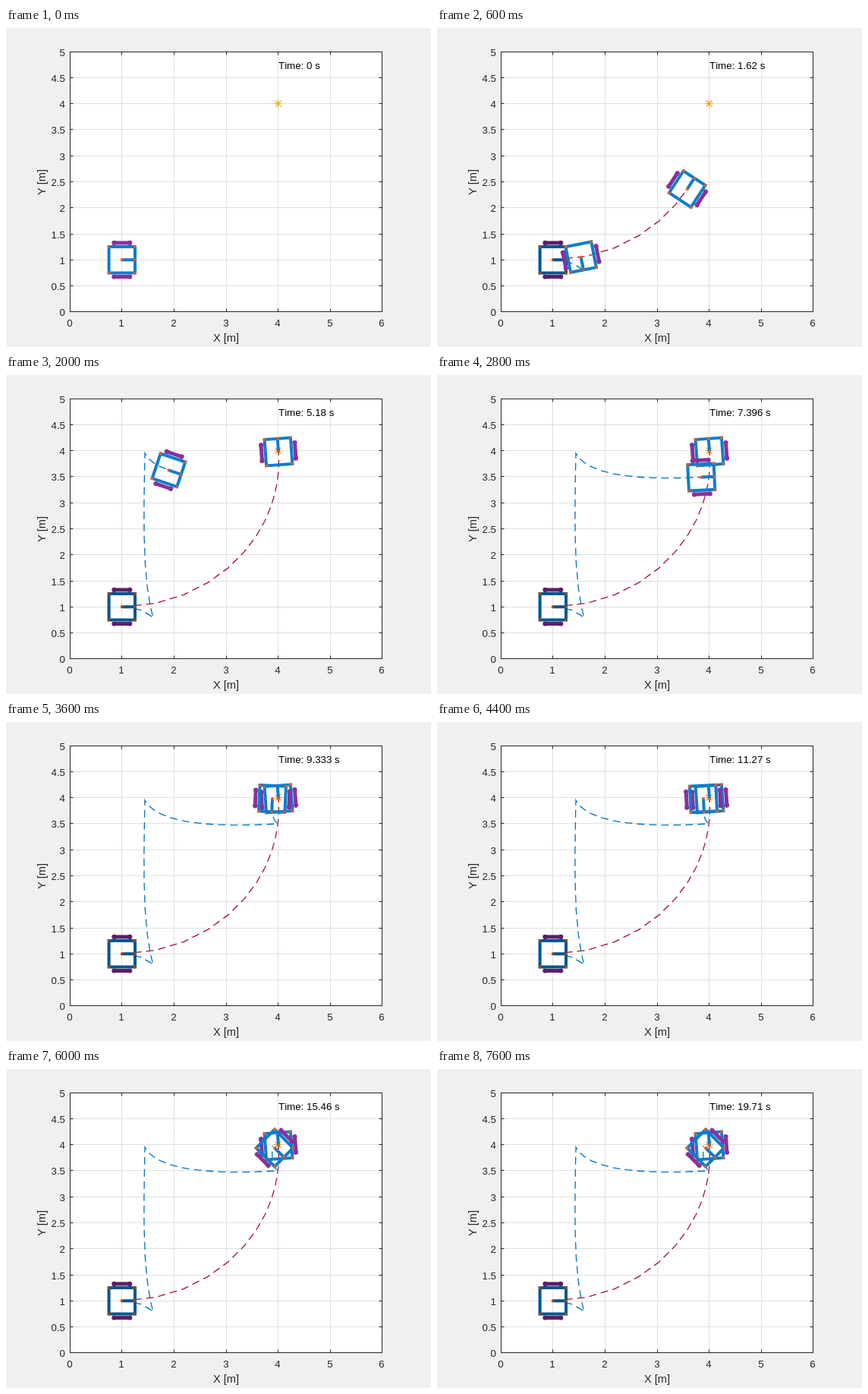
Animation, 560 px wide and 420 px high, one loop 7.8 s. Source, as an HTML page:

```html
<!DOCTYPE html>
<html lang="en">
<head>
<meta charset="utf-8">
<title>Two robots driving to a goal</title>
<style>
  html, body { margin: 0; width: 100%; height: 100%; overflow: hidden; background: #f0f0f0; }
  svg { display: block; width: 560px; height: 420px; }
  text { font: 13.33px "Liberation Sans", Arial, sans-serif; font-kerning: none; fill: #262626; }
  .title { font-size: 14.67px; }
  .grid { stroke: #dfdfdf; }
  .axis { stroke: #262626; fill: none; }
  .trail { fill: none; stroke-width: 1.3; stroke-dasharray: 10 6; }
  .robot { --body: #0a7dcc; --joint: #d95f2b; --wheel: #8a319b; }
  .robot.dark { --body: #00568f; --joint: #9c4a22; --wheel: #5b1f68; }
  .body { fill: none; stroke: var(--body); stroke-width: 4; }
  .joint { fill: var(--joint); }
  .wheel { stroke: var(--wheel); stroke-width: 5; }
  .hub { fill: var(--wheel); }
</style>
</head>
<body>
<svg id="stage" viewBox="0 0 560 420"></svg>
<script>
const STEP = 200, FRAMES = 39;
const stage = document.getElementById('stage');

function add(parent, tag, attrs, text) {
  const el = document.createElementNS('http://www.w3.org/2000/svg', tag);
  for (const key in attrs) el.setAttribute(key, attrs[key]);
  if (text !== undefined) el.textContent = text;
  parent.append(el);
  return el;
}
const path = (cls, d) => add(stage, 'path', { class: cls, d });
const label = (x, y, anchor, text, more) =>
  add(stage, 'text', { x, y, 'text-anchor': anchor, ...more }, text);

// Chart
const px = x => Math.round(83.8 + 68.6 * x);
const py = y => Math.round(373.49 - 68.58 * y);
const [left, right, top_, bottom] = [px(0), px(6), py(5), py(0)];
add(stage, 'rect', { x: left, y: top_, width: right - left, height: bottom - top_, fill: '#fff' });
let grid = '', ticks = '';
for (let x = 0; x <= 6; x++) {
  const p = px(x) + 0.5;
  grid += `M${p} ${top_}V${bottom}`;
  ticks += `M${p} ${top_}v4.5M${p} ${bottom + 1}v-4.5`;
  label(px(x), 393, 'middle', x);
}
for (let y = 0; y <= 5; y += 0.5) {
  const p = py(y) + 0.5;
  grid += `M${left} ${p}H${right}`;
  ticks += `M${left} ${p}h4.5M${right + 1} ${p}h-4.5`;
  label(78, py(y) + 6, 'end', y);
}
path('grid', grid);
path('axis', ticks + `M${left + 0.5} ${top_ + 0.5}H${right + 0.5}V${bottom + 0.5}H${left + 0.5}Z`);
label(290, 413, 'middle', 'X [m]', { class: 'title' });
label(0, 0, 'middle', 'Y [m]', { class: 'title', transform: 'translate(52 203) rotate(-90)' });
const clock = label(359, 54, 'start', '', { style: 'fill:#000' });

// Goal marker
const star = path('', 'M353 99.5h11M358.5 94v11M354.5 95.5l8 8M354.5 103.5l8-8');
star.setAttribute('stroke-width', 1.2);

const redTrail = path('trail', '');
const blueTrail = path('trail', '');
redTrail.style.stroke = '#a2142f';
blueTrail.style.stroke = '#0072bd';

function makeRobot() {
  const g = add(stage, 'g', { class: 'robot' });
  const half = 17.2, axle = 22.3, reach = 10.4;
  const dot = (cx, cy, r, cls) => add(g, 'circle', { cx, cy, r, class: cls });
  add(g, 'path', { class: 'body', d: `M${-half} ${-half}H${half}V${half}H${-half}ZM0 0H${half}` });
  for (const x of [-half, half]) for (const y of [-half, half]) dot(x, y, 2, 'joint');
  for (const x of [0, half]) dot(x, 0, 2, 'joint');
  for (const y of [-axle, axle]) {
    add(g, 'path', { class: 'wheel', d: `M${-reach} ${y}H${reach}` });
    for (const x of [-reach, reach]) dot(x, y, 3.1, 'hub');
  }
  return g;
}
const parked = makeRobot(), robotA = makeRobot(), robotB = makeRobot();

// Routes are Bezier legs; times count steps
const clamp = v => Math.min(1, Math.max(0, v));
const easeOut = u => 1 - (1 - u) ** 2;
const easeInOut = u => (1 - Math.cos(Math.PI * u)) / 2;
const home = [152.8, 305.2], dip = [194, 320], peak = [183, 103], edge = [358, 134], rest = [351, 101];

const routeA = [
  { from: 0, to: 7.6, ease: easeOut, curve: [home, [270, 305], [367, 212], [359, 101]] }
];
const routeB = [
  { from: 0, to: 2, curve: [home, [172, 305], [186, 312], dip] },
  { from: 2, to: 6.5, curve: [dip, [180, 270], [181, 200], peak], reverse: true },
  { from: 6.9, to: 15, curve: [peak, [200, 134], [270, 139], edge] },
  { from: 15, to: 18, curve: [edge, [350, 127], [350.2, 118], rest], reverse: true }
];

function poseAt(route, k) {
  const leg = route.findLast(l => l.from <= k);
  const t = (leg.ease || easeInOut)(clamp((k - leg.from) / (leg.to - leg.from)));
  const s = 1 - t, [a, b, c, d] = leg.curve;
  const [x, y] = [0, 1].map(i => s ** 3 * a[i] + 3 * s * s * t * b[i] + 3 * s * t * t * c[i] + t ** 3 * d[i]);
  const [dx, dy] = [0, 1].map(i => s * s * (b[i] - a[i]) + 2 * s * t * (c[i] - b[i]) + t * t * (d[i] - c[i]));
  return [x, y, Math.atan2(dy, dx) * 180 / Math.PI + (leg.reverse ? 180 : 0)];
}

// Near the goal the second robot hunts back and forth while it turns.
function poseB(k) {
  if (k <= 18) return poseAt(routeB, k);
  const turn = clamp((k - 22) / 8), back = k % 2;
  return [rest[0] + 3 * turn - 5 * back, rest[1] + 3 * turn + 18 * back, 87 - 42 * turn];
}

function trail(route, k) {
  const end = Math.min(k, route.at(-1).to);
  const pts = [];
  for (let i = 0; i < end; i += 0.5) pts.push(poseAt(route, i));
  pts.push(poseAt(route, end));
  return 'M' + pts.map(p => p[0] + ' ' + p[1]).join('L');
}

// Clock readings at a few steps, linear in between
const readings = { 0: 0, 6: 3.24, 10: 5.18, 14: 7.396, 22: 11.27, 30: 15.46, 38: 19.71 };
function seconds(k) {
  const keys = Object.keys(readings).map(Number);
  const a = keys.findLast(n => n <= k), b = keys.find(n => n > k) ?? a;
  const part = b > a ? (k - a) / (b - a) : 0;
  return +(readings[a] + (readings[b] - readings[a]) * part).toPrecision(4);
}

const place = (g, [x, y, turn]) =>
  g.setAttribute('transform', `translate(${x} ${y}) rotate(${turn})`);

function draw(k) {
  const moving = k > 0;
  clock.textContent = `Time: ${seconds(k)} s`;
  parked.classList.toggle('dark', moving);
  for (const el of [robotA, robotB, redTrail, blueTrail]) el.style.display = moving ? '' : 'none';
  star.style.stroke = moving ? '#f0a22c' : '#dcb432';
  redTrail.setAttribute('d', trail(routeA, k));
  blueTrail.setAttribute('d', trail(routeB, k));
  place(robotA, poseAt(routeA, k));
  place(robotB, poseB(k));
}

place(parked, [...home, 0]);
const start = performance.now();
let shown = -1;
function tick() {
  const k = Math.floor((performance.now() - start) / STEP) % FRAMES;
  if (k !== shown) draw(shown = k);
  requestAnimationFrame(tick);
}
tick();
</script>
</body>
</html>
```
